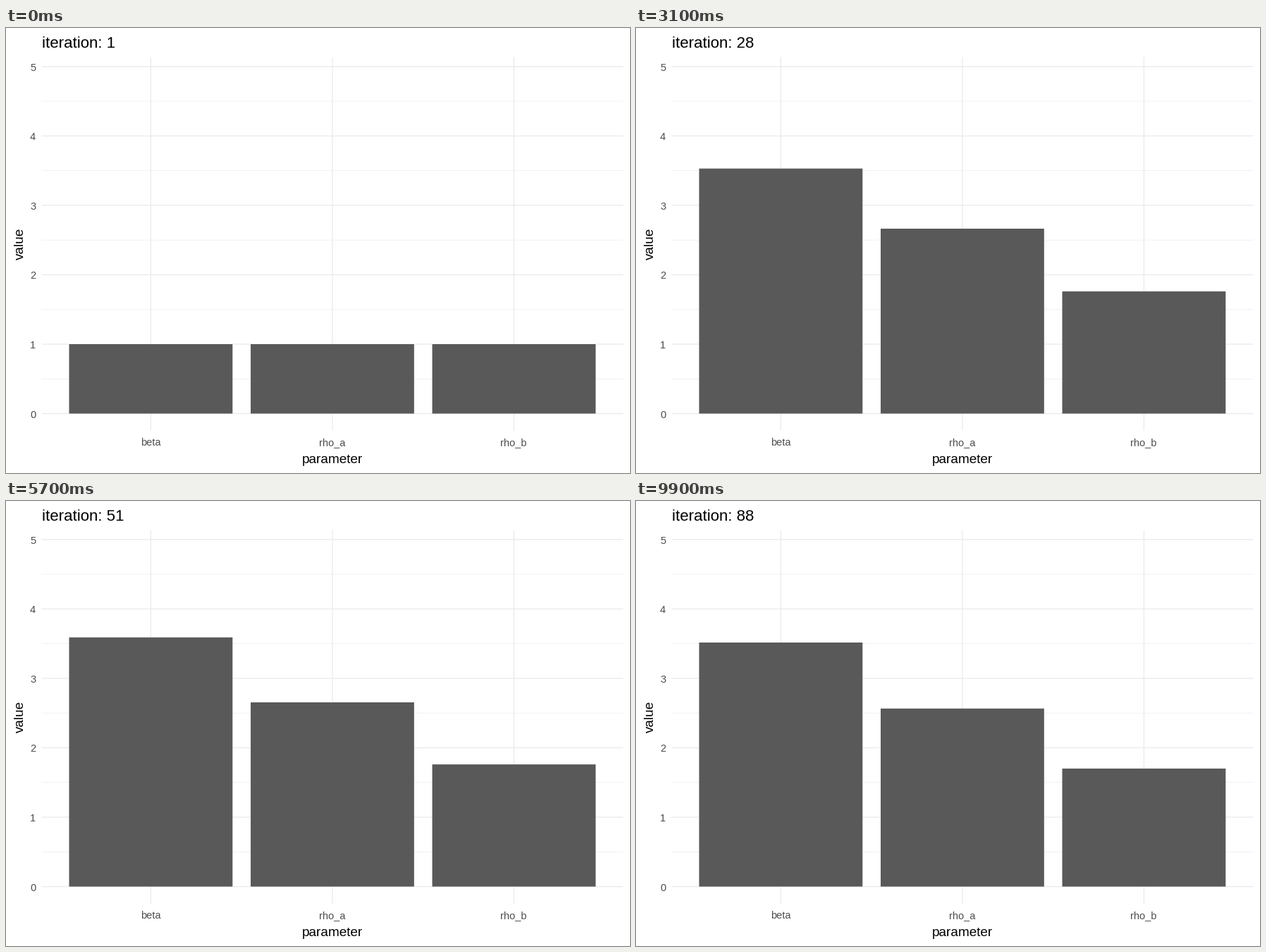
Recreate the animation shown at these times as a matplotlib script. Size 885 by 632 pixels, loop 10000 ms.

```python
import math

import matplotlib.pyplot as plt
import numpy as np
from matplotlib.animation import FuncAnimation
from matplotlib.patches import Rectangle

W, H, DPI = 885, 632, 100
FRAMES, INTERVAL, LAST_ITERATION = 100, 100, 88
ZERO_Y, UNIT = 547.6, 98.58
LEFT, RIGHT, TOP, BOTTOM = 50.6, 875.4, 41.4, 571.8
FIRST_CENTER, SPACING, BAR_WIDTH = 205.4, 257.5, 231.8
NAMES = ("beta", "rho_a", "rho_b")
GRID, BAR, TICK_TEXT = "#ebebeb", "#595959", "#4d4d4d"

plt.rcParams["font.family"] = "Liberation Sans"

# Key points of the search: frame -> (beta, rho_a, rho_b)
KEYS = {
    0: (1, 1, 1),
    21: (2.29, 1.69, 1.34),
    31: (3.53, 2.664, 1.76),
    43: (3.437, 2.57, 1.654),
    57: (3.59, 2.654, 1.76),
    80: (3.547, 2.555, 1.696),
    99: (3.516, 2.565, 1.70),
}
KEY_FRAMES = list(KEYS)
KEY_VALUES = np.array(list(KEYS.values()), dtype=float)
TOTAL_RISE = KEY_VALUES[-1] - KEY_VALUES[0]

fig = plt.figure(figsize=(W / DPI, H / DPI), dpi=DPI, facecolor="white")
ax = fig.add_axes([0, 0, 1, 1])
ax.set(xlim=(0, W), ylim=(H, 0))
ax.axis("off")


def points(px):
    return px * 72 / DPI


def value_y(value):
    return ZERO_Y - UNIT * value


def estimates(frame):
    """Accelerating climb, then swings of alternating sign that die out."""
    k = min(np.searchsorted(KEY_FRAMES, frame, side="right"),
            len(KEY_FRAMES) - 1) - 1
    start, end = KEY_FRAMES[k:k + 2]
    u = (frame - start) / (end - start)
    if k == 0:
        u, swing = u ** 2, 0
    else:
        decay = math.exp(-(frame - 26) / 13)
        swing = -(-1) ** k * .8 * decay * math.sin(math.pi * u) ** 3
    base = KEY_VALUES[k] + u * (KEY_VALUES[k + 1] - KEY_VALUES[k])
    return base + swing * TOTAL_RISE


def grid_line(xs, ys, width=1.33):
    ax.plot(xs, ys, color=GRID, lw=points(width), snap=False,
            solid_capstyle="butt", zorder=1)


def label(x, y, text, size, color="black", ha="center", **kwargs):
    return ax.text(x, y, text, fontsize=points(size), color=color, ha=ha,
                   va="baseline", **kwargs)


for half in range(5):
    y = value_y(half + .5)
    grid_line((LEFT, RIGHT), (y, y), .67)
for value in range(6):
    y = value_y(value)
    grid_line((LEFT, RIGHT), (y, y))
    label(42.2, y + 6, str(value), 14.67, TICK_TEXT, ha="right")

bars = []
for i, name in enumerate(NAMES):
    x = FIRST_CENTER + i * SPACING
    grid_line((x, x), (TOP, BOTTOM))
    label(x - .4, 592.6, name, 14.67, TICK_TEXT)
    bars.append(ax.add_patch(Rectangle(
        (x - BAR_WIDTH / 2, ZERO_Y), BAR_WIDTH, 0, facecolor=BAR, lw=0,
        snap=False, zorder=2)))

label(463, 618, "parameter", 19)
label(25, 306, "value", 19, rotation=90, rotation_mode="anchor")
title = label(50.6, 28, "", 22.3, ha="left")


def update(frame):
    iteration = round(1 + frame * (LAST_ITERATION - 1) / (FRAMES - 1))
    title.set_text(f"iteration: {iteration}")
    for bar, value in zip(bars, estimates(frame)):
        bar.set_height(-UNIT * value)
    return [title, *bars]


anim = FuncAnimation(fig, update, frames=FRAMES, interval=INTERVAL,
                     init_func=lambda: update(0), repeat=True, repeat_delay=0)
plt.show()
```
